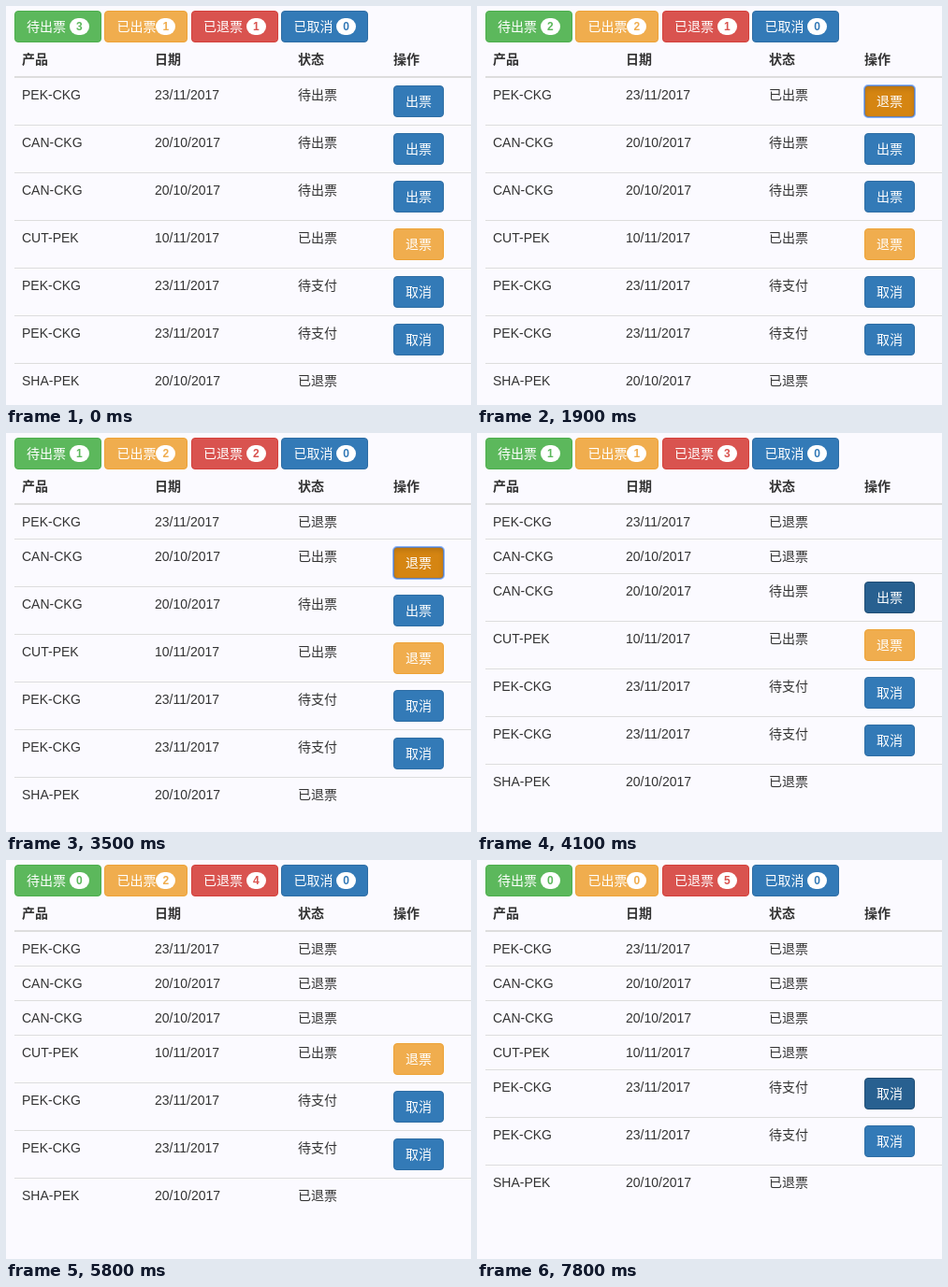
Recreate the animation shown at these times as an HTML page. Size 497x427 px, loop 8000 ms.

```html
<!DOCTYPE html>
<html lang="zh-CN">
<head>
<meta charset="utf-8">
<style>
* { box-sizing: border-box; }
html, body { margin: 0; width: 100%; height: 100%; overflow: hidden; background: #fbfaff; }
body {
  position: relative; color: #333;
  font: 14px/20px "Liberation Sans", "Noto Sans CJK SC", "Noto Sans CJK", sans-serif;
}
#tabs { position: absolute; left: 9px; top: 5px; display: flex; gap: 3.89px; }
#table { position: absolute; left: 9px; top: 39px; width: 488px; }
.row {
  display: grid; grid-template-columns: 142px 153px 102px 1fr; align-items: start;
  padding: 8px; border-top: 1px solid #ddd;
}
.head { font-weight: bold; border-top: 0; border-bottom: 2px solid #ddd; }
.head + .row { border-top: 0; }
.btn {
  height: 34px; padding: 6px 12px; border: 1px solid; border-radius: 4px;
  color: #fff; white-space: pre; justify-self: start;
}
.badge {
  display: inline-block; position: relative; top: -1px; padding: 3px 7px; border-radius: 10px;
  background: #fff; font-size: 12px; font-weight: bold; line-height: 1; vertical-align: middle;
}
.green { background: #5cb85c; border-color: #4cae4c; }
.red { background: #d9534f; border-color: #d43f3a; }
.blue { background: #337ab7; border-color: #2e6da4; }
.orange { background: #f0ad4e; border-color: #eea236; }
.green .badge { color: #5cb85c; }
.red .badge { color: #d9534f; }
.blue .badge { color: #337ab7; }
.orange .badge { color: #f0ad4e; }
.blue.hover, .blue.focus { background: #286090; border-color: #204d74; }
.orange.hover, .orange.focus { background: #ec971f; border-color: #d58512; }
.blue.press { background: #204d74; border-color: #122b40; }
.orange.press { background: #d58512; border-color: #985f0d; }
.press { box-shadow: inset 0 3px 5px rgba(0, 0, 0, .125); }
.focus, .press { outline: 2px solid rgba(77, 144, 254, .65); outline-offset: -1px; }
</style>
</head>
<body>
<div id="tabs"></div>
<div id="table"></div>
<script>
const LOOP = 8000;
const WAIT = '待出票', DONE = '已出票', BACK = '已退票', UNPAID = '待支付';
const tabs = [['green', '待出票 '], ['orange', '已出票'], ['red', '已退票 '], ['blue', '已取消 ']];
const actions = { [WAIT]: ['blue', '出票'], [DONE]: ['orange', '退票'], [UNPAID]: ['blue', '取消'] };
const tickets = [
  ['PEK-CKG', '23/11/2017', WAIT],
  ['CAN-CKG', '20/10/2017', WAIT],
  ['CAN-CKG', '20/10/2017', WAIT],
  ['CUT-PEK', '10/11/2017', DONE],
  ['PEK-CKG', '23/11/2017', UNPAID],
  ['PEK-CKG', '23/11/2017', UNPAID],
  ['SHA-PEK', '20/10/2017', BACK]
];
// time, row under the pointer, its status, its button look, tab counts
const steps = [
  [0, 0, WAIT, '', '3110'],
  [700, 0, WAIT, 'hover', '3110'],
  [900, 0, WAIT, 'press', '3110'],
  [1000, 0, DONE, 'focus', '3110'],
  [1200, 0, DONE, 'focus', '2210'],
  [1900, 0, DONE, 'press', '2210'],
  [2000, 0, BACK, '', '2120'],
  [2500, 1, WAIT, 'hover', '2120'],
  [3000, 1, WAIT, 'press', '2120'],
  [3100, 1, DONE, 'focus', '2120'],
  [3300, 1, DONE, 'focus', '1220'],
  [3500, 1, DONE, 'press', '1220'],
  [3600, 1, BACK, '', '1230'],
  [3800, 1, BACK, '', '1130'],
  [4100, 2, WAIT, 'hover', '1130'],
  [4700, 2, WAIT, 'press', '1130'],
  [4800, 2, DONE, 'focus', '1130'],
  [4900, 2, DONE, 'focus', '0230'],
  [5700, 2, DONE, 'press', '0230'],
  [5800, 2, BACK, '', '0240'],
  [6000, 2, BACK, '', '0140'],
  [6300, 3, DONE, 'hover', '0140'],
  [6800, 3, DONE, 'press', '0140'],
  [6900, 3, BACK, '', '0150'],
  [7100, 3, BACK, '', '0050'],
  [7800, 4, UNPAID, 'hover', '0050']
];

const $ = id => document.getElementById(id);
const button = (style, text) => `<div class="btn ${style}">${text}</div>`;
const row = (cells, style = '') =>
  `<div class="row ${style}">${cells.map(c => `<div>${c}</div>`).join('')}</div>`;

function ticketRow([route, date, status], look) {
  const action = actions[status];
  const cell = action ? `<div style="display:grid">${button(action[0] + ' ' + look, action[1])}</div>` : '';
  return row([route, date, status, cell]);
}

function render(n) {
  const [, active, , look, counts] = steps[n];
  const list = tickets.map(t => [...t]);
  for (const [, i, status] of steps.slice(0, n + 1)) list[i][2] = status;
  $('tabs').innerHTML = tabs.map(([color, label], i) =>
    button(color, `${label}<span class="badge">${counts[i]}</span>`)).join('');
  $('table').innerHTML = row(['产品', '日期', '状态', '操作'], 'head') +
    list.map((t, i) => ticketRow(t, i === active ? look : '')).join('');
}

let shown = -1;
const start = performance.now();
function tick() {
  const t = (performance.now() - start) % LOOP;
  const n = steps.filter(s => s[0] <= t).length - 1;
  if (n !== shown) render(shown = n);
  requestAnimationFrame(tick);
}
tick();
</script>
</body>
</html>
```
